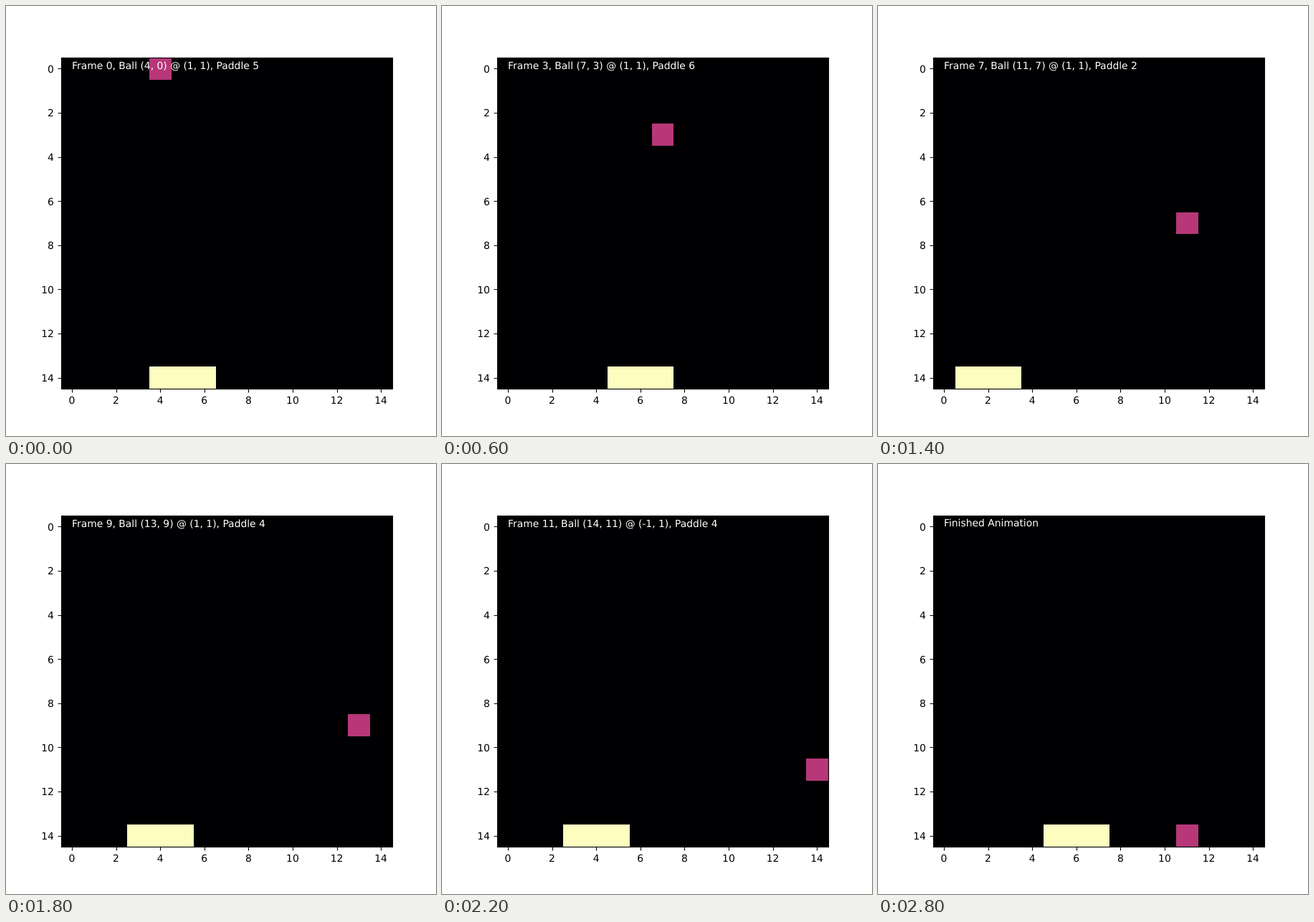
An HTML page that plays this animation: 600x600 px, repeating every 4800 ms.

```html
<!DOCTYPE html>
<html lang="en">
<head>
<meta charset="utf-8">
<title>Ball and paddle</title>
<style>
  html, body { margin: 0; width: 100%; height: 100%; overflow: hidden; background: #fff; }
  svg { display: block; width: 600px; height: 600px; }
  text { font: 13.889px "DejaVu Sans", sans-serif; text-rendering: geometricPrecision; white-space: pre; }
  .line { fill: none; stroke: #000; stroke-width: 1.111; }
  #ball, #paddle { shape-rendering: crispEdges; }
</style>
</head>
<body>
<svg viewBox="0 0 600 600">
  <rect x="77" y="72" width="463" height="463" fill="#000003"/>
  <rect id="paddle" fill="#fcfdbf"/>
  <rect id="ball" fill="#b73779"/>
  <rect class="line" x="77.5" y="72.5" width="462" height="462"/>
  <g id="axes"></g>
  <text id="status" x="92" y="88" fill="#fff"></text>
</svg>
<script>
  const CELL = 30.8, STEP = 200, LOOP = 4800, LAST = 14;
  const PADDLE = [5, 6, 6, 6, 5, 4, 3, 2, 3, 4, 3, 4, 5, 5, 6];
  const get = id => document.getElementById(id);
  const ball = get('ball'), paddle = get('paddle'), status = get('status');

  const edgeX = col => Math.round(77 + CELL * col);
  const edgeY = row => Math.round(72 + CELL * row);

  function add(tag, attrs, label = '') {
    const el = document.createElementNS('http://www.w3.org/2000/svg', tag);
    for (const name in attrs) el.setAttribute(name, attrs[name]);
    el.textContent = label;
    get('axes').append(el);
  }

  function drawAxes() {
    for (let n = 0; n <= LAST; n += 2) {
      const x = 91.9 + CELL * n, y = 87.4 + CELL * n;
      const tx = Math.round(x) + 0.5, ty = Math.round(y) + 0.5;
      add('path', { class: 'line', d: `M${tx} 534.5V539.5M77.5 ${ty}H72.5` });
      add('text', { x, y: 555, 'text-anchor': 'middle' }, n);
      add('text', { x: 66.8, y: Math.round(y + 5.3), 'text-anchor': 'end' }, n);
    }
  }

  // Places a block one row high on the grid.
  function place(el, col, row, cols) {
    const x = edgeX(col), y = edgeY(row);
    el.setAttribute('x', x);
    el.setAttribute('y', y);
    el.setAttribute('width', edgeX(col + cols) - x);
    el.setAttribute('height', edgeY(row + 1) - y);
  }

  let shown = -1;

  function render(step) {
    if (step === shown) return;
    shown = step;
    const bounced = step > 10, done = step === LAST;
    const x = bounced ? 25 - step : 4 + step;
    const pad = PADDLE[step];
    place(ball, x, step, 1);
    place(paddle, pad - 1, LAST, 3);
    status.setAttribute('y', done ? 87 : 88);
    status.textContent = done
      ? 'Finished Animation'
      : `Frame ${step}, Ball (${x}, ${step}) @ (${bounced ? -1 : 1}, 1), Paddle ${pad}`;
  }

  function tick() {
    const time = performance.now() % LOOP;
    render(Math.min(LAST, Math.floor(time / STEP)));
    requestAnimationFrame(tick);
  }

  drawAxes();
  tick();
</script>
</body>
</html>
```
